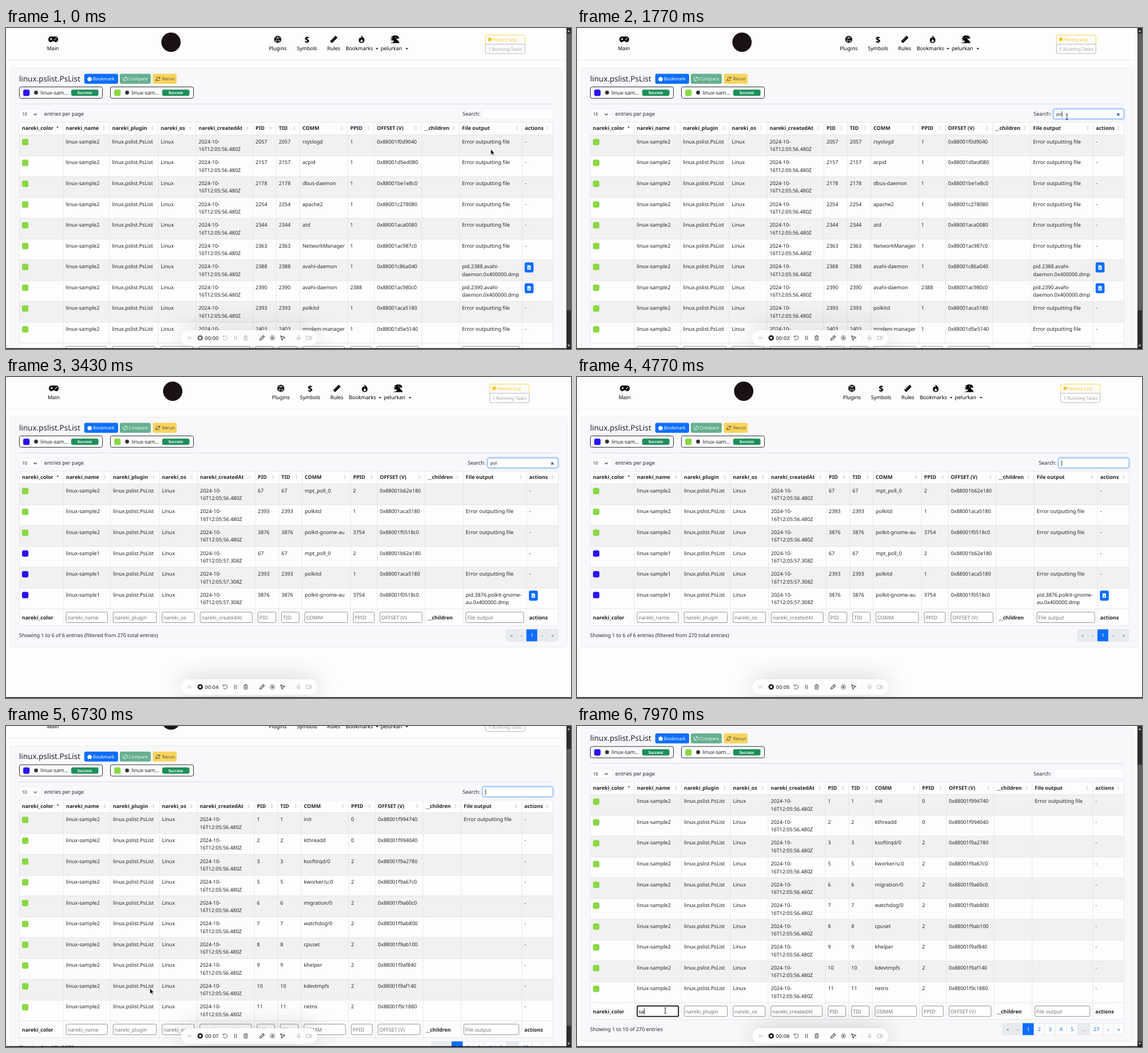
Animation, 993 px wide and 564 px high, one loop 8000 ms. Source, as an HTML page with a canvas:

```html
<!DOCTYPE html>
<html lang="en">
<head>
<meta charset="utf-8">
<title>Process list search</title>
<style>
html, body { margin: 0; width: 100%; height: 100%; overflow: hidden; background: #fdfdfd; }
canvas { display: block; }
</style>
</head>
<body>
<canvas id="stage" width="993" height="564"></canvas>
<script>
const ctx = document.getElementById('stage').getContext('2d');
const LOOP = 8000, STEP = 100 / 3, ROW = 36.56, TOP = 188;
const BODY = 9, SMALL = 7.875;
const INK = '#212529', BLUE = '#0d6efd', LINE = '#e2e3ec', GREY = '#757575';
const GREEN_CHIP = '#8ad843', BLUE_CHIP = '#2a12f5';
const HEADS = ['nareki_color', 'nareki_name', 'nareki_plugin', 'nareki_os', 'nareki_createdAt',
  'PID', 'TID', 'COMM', 'PPID', 'OFFSET (V)', '__children', 'File output', 'actions'];
const NO_FILTER = [0, 10, 12];

// Rows: pid, command, parent pid, offset, file (E = error text)
const VIEWS = {
  late: {
    width: 985, shift: 0,
    edges: [23, 100, 181.5, 267, 333.5, 433.5, 474.5, 516, 600, 647, 730, 796.5, 907, 961],
    rows: `2057 rsyslogd 1 1f0d9040 E|2157 acpid 1 1d5ed080 E|2178 dbus-daemon 1 1be1e8c0 E
2254 apache2 1 1c278080 E|2344 atd 1 1aca0080 E|2363 NetworkManager 1 1ac987c0 E
2388 avahi-daemon 1 1c86a040 pid.2388.avahi-/daemon.0x400000.dmp
2390 avahi-daemon 2388 1ac980c0 pid.2390.avahi-/daemon.0x400000.dmp
2393 polkitd 1 1aca5180 E|2403 modem-manager 1 1d5e5140 E`
  },
  found: {
    width: 993, shift: 1,
    edges: [23, 100.5, 183, 269, 336, 437.5, 479, 520, 605, 652, 736, 803, 914.5, 970],
    rows: `67 mpt_poll_0 2 1b62e180|2393 polkitd 1 1aca5180 E|3876 polkit-gnome-au 3754 1f0518c0 E
67 mpt_poll_0 2 1b62e180|2393 polkitd 1 1aca5180 E
3876 polkit-gnome-au 3754 1f0518c0 pid.3876.polkit-gnome-/au.0x400000.dmp`
  },
  first: {
    width: 985, shift: 0,
    edges: [23, 100.5, 183, 269, 335.5, 436, 477, 518.5, 601.5, 648.5, 732.5, 799.5, 906, 961],
    rows: `1 init 0 1f994740 E|2 kthreadd 0 1f994040|3 ksoftirqd/0 2 1f9a2780|5 kworker/u:0 2 1f9a67c0
6 migration/0 2 1f9a60c0|7 watchdog/0 2 1f9ab800|8 cpuset 2 1f9ab100|9 khelper 2 1f9af840
10 kdevtmpfs 2 1f9af140|11 netns 2 1f9c1880`
  }
};
for (const v of Object.values(VIEWS)) v.rows = v.rows.split(/[|\n]/).map(r => r.split(' '));

// Timeline
const SEARCH_KEYS = [[1200, ''], [1450, 'p'], [1650, 'po'], [1850, 'pol'], [4100, 'po'], [4300, 'p'], [4500, '']];
const NAME_KEYS = [[7250, ''], [7550, 's'], [7750, 'sa']];
const MOUSE = [[0, 852, 213], [250, 852, 213], [900, 861, 156], [5450, 861, 156], [6200, 247, 470],
  [6600, 247, 470], [6730, 253, 461], [6820, 253, 461], [7200, 155, 500]];

const ease = p => p * p * (3 - 2 * p);
const clamp01 = p => Math.max(0, Math.min(1, p));
const lastKey = (keys, t) => keys.filter(k => k[0] <= t).pop();
const caretOn = (key, t) => (t - key[0]) % 1000 < 500;

function mouseAt(t) {
  const i = MOUSE.findIndex(m => m[0] > t);
  if (i < 0) return MOUSE[MOUSE.length - 1].slice(1);
  const [t0, x0, y0] = MOUSE[i - 1], [t1, x1, y1] = MOUSE[i];
  const p = ease((t - t0) / (t1 - t0));
  return [x0 + (x1 - x0) * p, y0 + (y1 - y0) * p];
}

// Drawing helpers
function text(s, x, y, color = INK, size = BODY, weight = 400, align = 'left', family = '"Noto Sans"') {
  ctx.font = `${weight} ${size}px ${family}, sans-serif`;
  ctx.textAlign = align;
  ctx.fillStyle = color;
  ctx.fillText(s, x, y + size * 0.375);
}
function box(x, y, w, h, r, fill, stroke, lw = 1) {
  ctx.beginPath();
  ctx.roundRect(x, y, w, h, r);
  if (fill) { ctx.fillStyle = fill; ctx.fill(); }
  if (stroke) { ctx.strokeStyle = stroke; ctx.lineWidth = lw; ctx.stroke(); }
}
function rect(x, y, w, h, color) {
  ctx.fillStyle = color;
  ctx.fillRect(x, y, w, h);
}
function dot(x, y, r, color) {
  ctx.beginPath();
  ctx.arc(x, y, r, 0, 7);
  ctx.fillStyle = color;
  ctx.fill();
}
function path(d, x, y, fill, stroke, lw = 1) {
  const p = new Path2D(d);
  ctx.save();
  ctx.translate(x, y);
  if (fill) { ctx.fillStyle = fill; ctx.fill(p); }
  if (stroke) { ctx.strokeStyle = stroke; ctx.lineWidth = lw; ctx.stroke(p); }
  ctx.restore();
}

function drawNav(v) {
  const s = v.shift, x = 5.5 * s, bg = '#fdfdfd';
  path('M-4.5-5h9a3.8 4.6 0 0 1 0 10c-2 0-2.4-1.8-3.2-1.8h-2.6c-.8 0-1.2 1.8-3.2 1.8a3.8 4.6 0 0 1 0-10z', 83 + s, 20, '#000');
  path('M-5.8-.6h4M-3.8-2.6v4', 83 + s, 20, null, bg, 1.2);
  dot(86 + s, 20.6, 1, bg);
  dot(88 + s, 18, 1, bg);
  text('Main', 82.5 + s * 1.2, 36, '#000', BODY, 400, 'center');

  dot(290 + 3 * s, 25, 17, '#1a1113');

  path('M0-7 6-3.5V3.5L0 7-6 3.5V-3.5z', 477.5 + x, 20, '#000');
  path('M-6-3 0-3.2 6-3M0-7V-3.2L-3.5 2.5H3.5L0-3.2M-6 3.5-3.5 2.5 0 7 3.5 2.5 6 3.5', 477.5 + x, 20, null, bg, .7);
  text('$', 529 + x, 20, '#000', 15, 600, 'center');
  path('M-6.5 3 3-6.5 6.5-3-3 6.5z', 576 + x, 20, '#000');
  path('M-3.8.5-2.2 2.1M-1.5-1.8.1-.2M.8-4.1 2.4-2.5', 576 + x, 20, null, bg, .9);
  path('M-1-7C2-5 5-2 5 1.5A5 5 0 0 1-5 1.5C-5-1-3.2-2.5-2.7-4-2-3-1.6-2.5-1-2 0-3.5-.2-5-1-7z', 625 + x, 20, '#000');
  path('M0 0C3 2 2.5 5 0 5S-3 2 0 0z', 625 + x, 20, bg);
  path('M-7-4-1-7 5-6.5 8-3 7-1 3-1.8C3 1 8 2 8.5 6.5H-8C-4 5 0 5-2 2L-7 2-4 0-8-1-3-3z', 683 + x, 20, '#000');
  dot(684.5 + x, 16.5, .8, bg);

  text('Plugins', 477.5 + x, 36, '#000', BODY, 400, 'center');
  text('Symbols', 529 + x, 36, '#000', BODY, 400, 'center');
  text('Rules', 576 + x, 36, '#000', BODY, 400, 'center');
  text('Bookmarks', 597 + x, 36, '#000');
  text('pelurkan', 658.5 + x, 36, '#000');
  for (const c of [652, 704.5]) path('M-2.3-1.2H2.3L0 1.2z', c + x, 36.5, '#000');

  const b = 842.5 + 7.5 * s;
  box(b, 12.5, 69.5, 16, [3, 3, 0, 0], null, '#fbd34f');
  box(b, 28.5, 69.5, 16.5, [0, 0, 3, 3], null, '#b4b8bc');
  path('M-3-3H3V1L1 3H-3z', b + 8, 20, '#fac31a');
  text('History Log', b + 12.5, 20, '#fac31a', SMALL);
  text('1 Running Tasks', b + 35, 37, '#9ea3a8', SMALL, 400, 'center');
  rect(0, 56, v.width, 1, '#eeeee4');
}

function drawTitle(right) {
  text('linux.pslist.PsList', 23, 88.5, INK, 13.5, 500);
  box(137.5, 80.5, 59.5, 17.5, 3, BLUE);
  path('M-4-1-2-2.5-1-4 1-3 3-2 4 0 3 2V4H1L0 3-1 4H-3V2L-4 1z', 147, 89.5, '#fff');
  text('Bookmark', 152.8, 89.5, '#fff', SMALL);
  box(200, 80.5, 54.5, 17.5, 3, '#66b08f');
  path('M-3.5-3V2.5H0M3.5 3V-2.5H0M1.2-4-.6-2.5 1.2-1M-1.2 1 .6 2.5-1.2 4', 209.5, 89.5, null, '#e6f3ec', 1);
  text('Compare', 215.5, 89.5, '#f0f8f4', SMALL);
  box(258, 80.5, 42, 17.5, 3, '#f8d45c');
  path('M3-1A3.2 3.2 0 0 0-3-1.2M-3 1A3.2 3.2 0 0 0 3 1.2M3.4-4V-1H.6M-3.4 4V1H-.6', 267, 89.5, null, '#57543f', 1);
  text('Rerun', 274.5, 89.5, '#57543f', SMALL);

  [[23, BLUE_CHIP], [183, GREEN_CHIP]].forEach(([x, color]) => {
    box(x + .5, 103.5, 146, 20, 3, '#fafbfc', '#2c3035');
    box(x + 7.2, 108.2, 11.25, 11.25, 3, color);
    dot(x + 29.8, 113.5, 3.4, '#333');
    text('linux-sam...', x + 37.8, 113.3);
    box(x + 91.5, 108.3, 48, 11, 3, '#1d8f5a');
    text('Success', x + 115.3, 113.7, '#fff', 6.75, 700, 'center');
  });
  rect(23, 133, right - 23, 1, '#d9d9ea');
}

function drawSearch(right, t) {
  box(23.5, 142.5, 38.5, 17.5, 3, '#fdfdfe', '#ebebf2', .8);
  text('10', 28, 151.5, INK, SMALL);
  path('M-2.5-1.2 0 1.3 2.5-1.2', 51.5, 151.7, null, '#343a40', 1.1);
  text('entries per page', 67.3, 151);
  text('Search:', right - 127.5, 151, INK, BODY, 400, 'right');
  const key = lastKey(SEARCH_KEYS, t), focus = key && t < 7250, x = right - 123.5;
  if (focus) box(x - 1, 141.5, 125.5, 19, 4, null, '#c5dcfd', 2.4);
  box(x, 142.5, 123.5, 17, 3, '#fdfdff', focus ? '#86b7fe' : '#ececf2', focus ? 1 : .8);
  if (!focus) return;
  text(key[1], x + 4.7, 151.5, INK, SMALL);
  const w = ctx.measureText(key[1]).width;
  if (caretOn(key, t)) rect(x + 5 + w, 146.5, .9, 10, '#111');
  if (key[1]) path('M-2-2 2 2M2-2-2 2', right - 9.7, 152, null, '#27477f', 1.4);
}

function drawTable(v, t) {
  const { edges, rows } = v, right = edges[13], foot = TOP + rows.length * ROW;
  rect(23, 165, right - 23, foot + 29.5 - 165, '#fdfdfe');
  rows.forEach((r, i) => { if (i % 2 === 0) rect(23, TOP + i * ROW, right - 23, ROW, '#f1f1f1'); });
  edges.forEach(x => rect(x, 165, .8, foot + 29.5 - 165, LINE));
  rect(23, 165, right - 23, .8, LINE);
  for (let i = 0; i <= rows.length; i++) rect(23, TOP + i * ROW - .5, right - 23, .9, LINE);
  rect(23, foot + 29, right - 23, .9, LINE);

  HEADS.forEach((h, i) => {
    text(h, edges[i] + 5, 176, INK, BODY, 700);
    const x = edges[i + 1] - 9.5;
    path('M-2-.8H2L0-3.6z', x, 176, i ? '#cfd1d4' : '#444');
    if (i) path('M-2 .8H2L0 3.6z', x, 176, '#cfd1d4');
  });

  rows.forEach(([pid, comm, ppid, off, file], i) => {
    const top = TOP + i * ROW, y = top + 11.5, second = v === VIEWS.found && i > 2;
    const cell = (c, ...lines) => lines.forEach((s, n) => text(s, edges[c] + 5, y + n * 13.5));
    box(28.1, top + 6.8, 11.25, 11.25, 3, second ? BLUE_CHIP : GREEN_CHIP);
    cell(1, second ? 'linux-sample1' : 'linux-sample2');
    cell(2, 'linux.pslist.PsList');
    cell(3, 'Linux');
    cell(4, '2024-10-', second ? '16T12:05:57.308Z' : '16T12:05:56.480Z');
    cell(5, pid);
    cell(6, pid);
    cell(7, comm);
    cell(8, ppid);
    cell(9, '0x8800' + off);
    if (file === 'E') cell(11, 'Error outputting file');
    else if (file) cell(11, ...file.split('/'));
    if (file && file !== 'E') {
      const x = edges[12] + 4.5;
      box(x, top + 4.5, 15.7, 17.7, 3, BLUE);
      path('M-3-4H1L3-2V4H-3z', x + 7.8, top + 13.3, '#fff');
      path('M0-1V2.5M-1.5 1 0 2.5 1.5 1', x + 7.8, top + 13.3, null, BLUE, .9);
    } else cell(12, '-');
  });
  drawFooter(v, foot, t);
}

function drawFooter(v, foot, t) {
  const { edges } = v, y = foot + 15.2, key = lastKey(NAME_KEYS, t);
  HEADS.forEach((h, i) => {
    const x = edges[i] + 5;
    if (NO_FILTER.includes(i)) return text(h, x, y, INK, BODY, 700);
    const focus = i === 1 && key;
    box(x + .3, foot + 5.7, edges[i + 1] - x - 5, 18.5, 2, '#fff', focus ? '#101010' : '#858585', focus ? 1.8 : .9);
    if (!focus || !key[1]) text(h, x + 2.7, y, GREY);
    if (!focus) return;
    text(key[1], x + 2.7, y, '#000');
    const w = ctx.measureText(key[1]).width;
    if (caretOn(key, t)) rect(x + 3 + w, foot + 9.7, .9, 11, '#000');
  });

  const few = v === VIEWS.found;
  text(few ? 'Showing 1 to 6 of 6 entries (filtered from 270 total entries)' : 'Showing 1 to 10 of 270 entries', 23, foot + 46.5);
  const labels = few ? ['«', '‹', '1', '›', '»'] : ['«', '‹', '1', '2', '3', '4', '5', '…', '27', '›', '»'];
  const xs = few ? [879.5, 897.5, 915, 934, 951.5, 970]
    : [748, 766, 783.5, 803, 822, 841, 860.5, 880, 901, 925, 943, 961];
  labels.forEach((s, i) => {
    const x = xs[i], w = xs[i + 1] - x, on = s === '1', off = few || i < 2 || s === '…';
    box(x, foot + 36.4, w, 20.3, 0, on ? BLUE : off ? '#e9ecef' : '#fdfdfe', on ? BLUE : '#dee2e6', .7);
    text(s, x + w / 2, foot + 46.4, on ? '#fff' : off ? '#6c757d' : BLUE, BODY, 400, 'center');
  });
}

function drawScrollbar(scroll) {
  rect(985, 0, 8, 564, '#2d2d2e');
  rect(985.5, 10 + scroll * .86, 7.5, 486, '#5e5e60');
  path('M-2.5 1.5H2.5L0-2z', 989, 5.5, '#b0b0b0');
  path('M-2.5-1.5H2.5L0 2z', 989, 558, '#b0b0b0');
}

function drawToolbar(t) {
  const live = t >= 120, dark = '#3a3a40', tone = live ? '#55555e' : '#b9b9bf', faint = '#bdbdc2', y = 544.5;
  ctx.save();
  ctx.shadowColor = 'rgba(0,0,0,.2)';
  ctx.shadowBlur = 44;
  box(308, 531, 239, 27.5, 13.7, '#fdfdfd');
  ctx.restore();
  for (let i = 0; i < 6; i++) dot(320.2 + (i % 3) * 2.3, y - 1.2 + (i > 2 ? 2.5 : 0), .65, '#888');
  dot(341.3, y, 4.8, live ? '#25252b' : '#77777c');
  box(339.6, y - 1.7, 3.4, 3.4, .8, '#fff');
  const sec = Math.floor((t + 850) / 1000);
  text('00:0' + sec, 361.5, y, '#333338', 8.5, 500, 'center', 'Inter');
  path('M-3.2-2A3.7 3.7 0 1 1-3.6 1.2M-3.8-4.2V-1.6H-1.2', 385.3, y, null, tone, 1);
  path('M-1.6-3.8V3.8M1.6-3.8V3.8', 403.3, y, null, tone, 1.1);
  path('M-3.8-2.6H3.8M-1.4-2.6V-4H1.4V-2.6M-2.9-2.4-2.5 4H2.5L2.9-2.4M-.9-.8V2.4M.9-.8V2.4', 421.3, y, null, tone, 1);
  rect(436, y - 5, .7, 10, '#eeeeee');
  path('M-3.8 3.8-3.2 1.2 2-4 4-2-1.2 3.2z', 450, y, null, dark, 1.1);
  for (let i = 0; i < 25; i++) {
    const a = i % 5 - 2, b = Math.floor(i / 5) - 2;
    if (Math.abs(a) + Math.abs(b) < 4) dot(468.3 + a * 1.9, y + b * 1.9, a || b ? .6 : 1.2, dark);
  }
  path('M-3.6-3.6 3.8-1 .6.6-1 3.8z', 486.3, y, null, dark, 1.1);
  rect(500, y - 5, .7, 10, '#eeeeee');
  path('M-1.5-3A1.5 1.5 0 0 1 1.5-3V0A1.5 1.5 0 0 1-1.5 0zM-3.2-.4A3.2 3.2 0 0 0 3.2-.4M0 2.8V4.5', 514.3, y, null, faint, 1);
  path('M-4.5-3H1.5V3H-4.5zM1.5-.8 4.5-2.6V2.6L1.5.8', 532.3, y, null, faint, 1);
}

function drawMouse(t) {
  if (t >= 1850 && t < 5400) return;
  const [x, y] = mouseAt(t);
  const beam = (x > 837 && y > 142 && y < 161) || (t > 7000 && y > 491);
  if (beam) path('M-2-5Q0-5 0-4Q0-5 2-5M0-4V4M-2 5Q0 5 0 4Q0 5 2 5', x, y, null, '#222', 1);
  else path('M0 0V9.6L2.2 7.6 3.7 11 5.3 10.3 3.8 7H6.8z', x, y, '#0a0a0a', '#fff', .6);
}

function draw(t) {
  const v = t < 2700 ? VIEWS.late : t < 5250 ? VIEWS.found : VIEWS.first;
  const scroll = 67.5 * ease(clamp01((t - 6661) / 140));
  const right = v.edges[13], foot = TOP + v.rows.length * ROW;
  rect(0, 0, 993, 564, '#fdfdfd');
  ctx.save();
  ctx.translate(0, -scroll);
  drawNav(v);
  box(7.5, 70.5, right + 16 - 7, foot + 67 - 70.5, 3, '#f8f8fb', '#ececf2');
  drawTitle(right);
  drawSearch(right, t);
  drawTable(v, t);
  ctx.restore();
  if (v.width < 993) drawScrollbar(scroll);
  drawToolbar(t);
  rect(0, 562.6, 993, 1.4, '#111');
  drawMouse(t);
}

ctx.textRendering = 'geometricPrecision';
const start = performance.now();
function tick() {
  const t = (performance.now() - start) % LOOP;
  draw(Math.floor((t + 4) / STEP) * STEP);
  requestAnimationFrame(tick);
}
tick();
</script>
</body>
</html>
```
